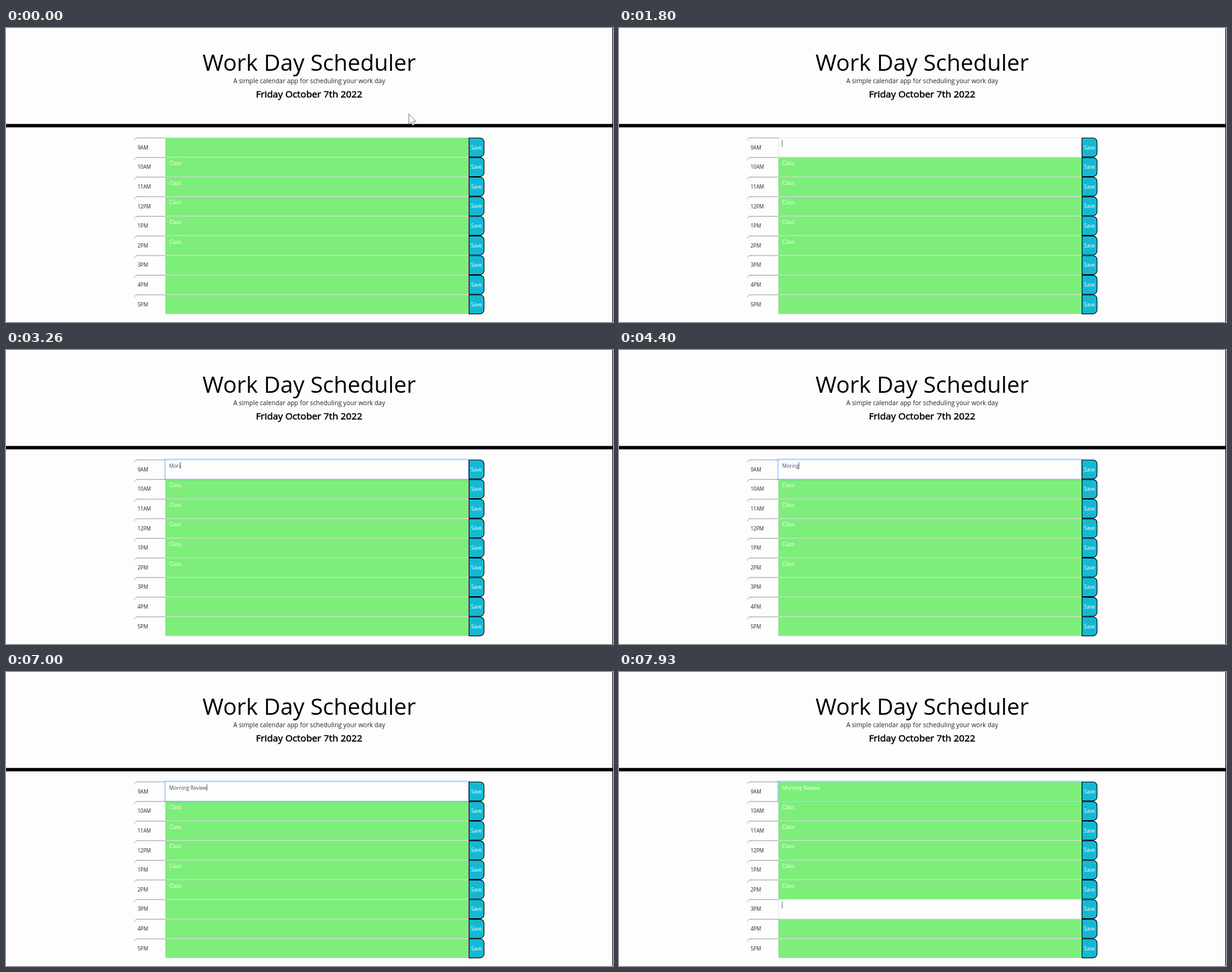
An HTML page with a canvas for the animation above (8000 ms loop, 980 by 474 pixels).

```html
<!DOCTYPE html>
<html lang="en">
<head>
<meta charset="utf-8">
<title>Work Day Scheduler</title>
<style>
  html, body { margin: 0; width: 100%; height: 100%; overflow: hidden; background: #fdfdfd; }
  canvas { display: block; width: 980px; height: 474px; }
</style>
</head>
<body>
<canvas id="stage"></canvas>
<script>
const W = 980, H = 474, LOOP = 8000;
const canvas = document.getElementById('stage');
const ctx = canvas.getContext('2d');
const dpr = window.devicePixelRatio || 1;
canvas.width = W * dpr;
canvas.height = H * dpr;

const PAPER = '#fdfdfd', GREEN = '#7dee79', CYAN = '#13b9d3';
const HOURS = ['9AM', '10AM', '11AM', '12PM', '1PM', '2PM', '3PM', '4PM', '5PM'];
const REM = 8.15;
const TOP = 176.7, PITCH = 31.63;
const LEFT = 207, FIELD = 257, BUTTON = 747, RIGHT = 772;
const EDGE = 0.6, FADE = 150;
const FIRST_CLICK = 1790, SECOND_CLICK = 7860, BLUR = 7920;

// [start ms, text, caret shown]
const TYPING = [
  [0, '', 1], [2330, '', 0], [2860, '', 1],
  [2930, 'M', 1], [3060, 'Mo', 1], [3200, 'Mor', 1], [3260, 'Mori', 1],
  [3400, 'Morin', 1], [3600, 'Moring', 1], [4000, 'Moring', 0], [4400, 'Moring', 1],
  [4530, 'Morin', 1], [4660, 'Mori', 1], [4800, 'Mor', 1],
  [5130, 'Morn', 1], [5330, 'Morni', 1], [5460, 'Mornin', 1], [5530, 'Morning', 1],
  [5730, 'Morning ', 1], [6060, 'Morning R', 1], [6130, 'Morning Re', 1],
  [6260, 'Morning Rev', 1], [6460, 'Morning Revi', 1], [6530, 'Morning Revie', 1],
  [6600, 'Morning Review', 1], [7130, 'Morning Review', 0], [7630, 'Morning Review', 1]
];

const clamp = v => Math.min(1, Math.max(0, v));
const ease = v => v * v * (3 - 2 * v);
const fade = (t, from) => ease(clamp((t - from) / FADE));
const mix = (a, b, k) => `rgb(${a.map((v, i) => Math.round(v + (b[i] - v) * k))})`;

function text(str, x, y, size, color, align = 'left') {
  ctx.font = `${size}px "Open Sans", sans-serif`;
  ctx.textAlign = align;
  ctx.fillStyle = color;
  ctx.fillText(str, x, y);
}

function rect(x, y, w, h, color) {
  ctx.fillStyle = color;
  ctx.fillRect(x, y, w, h);
}

function header() {
  text('Work Day Scheduler', 489.5, 69, REM * 4.5, '#000', 'center');
  text('A simple calendar app for scheduling your work day', 489.5, 89.4, REM * 1.25, '#212529', 'center');
  const date = 'Friday October 7th 2022';
  text(date, 489.3, 112.3, REM * 1.875, '#000', 'center');
  ctx.strokeStyle = '#000';
  ctx.lineWidth = 0.55;
  ctx.lineJoin = 'round';
  ctx.strokeText(date, 489.3, 112.3);
  rect(0, 154.7, W, 5.5, '#000');
  rect(979, 0, 1, H, '#000');
}

function hourLabel(hour, y) {
  const line = y + 0.4;
  ctx.lineWidth = 0.6;
  ctx.strokeStyle = '#888';
  ctx.beginPath();
  ctx.moveTo(LEFT + 0.2, line + 4.5);
  ctx.quadraticCurveTo(LEFT + 0.5, line + 0.4, LEFT + 4.5, line);
  ctx.stroke();
  ctx.lineWidth = 0.75;
  ctx.strokeStyle = '#222';
  ctx.setLineDash([1.5, 1]);
  ctx.beginPath();
  ctx.moveTo(LEFT + 4, line);
  ctx.lineTo(FIELD, line);
  ctx.stroke();
  ctx.setLineDash([]);
  text(hour, 212.4, y + 19, REM, '#212529');
}

function field({ y, value, focus, glow, caret }) {
  const w = BUTTON - FIELD;
  if (glow > 0) {
    const g = 1.63 * glow;
    rect(FIELD - g, y - g, w + 2 * g, PITCH + 2 * g, `rgba(0,123,255,${0.25 * glow})`);
  }
  rect(FIELD, y, w, PITCH, mix([206, 212, 218], [128, 189, 255], glow));
  rect(FIELD + EDGE, y + EDGE, w - 2 * EDGE, PITCH - 2 * EDGE, focus ? PAPER : GREEN);
  text(value, 263.6, y + 12.8, REM, focus ? '#495057' : '#fff');
  if (caret) {
    const x = Math.floor(263.6 + ctx.measureText(value).width);
    rect(x, y + 3.8, 0.8, 11.2, '#495057');
  }
}

function saveButton(y) {
  ctx.beginPath();
  ctx.roundRect(BUTTON + 0.5, y + 0.5, RIGHT - BUTTON - 0.7, PITCH - 1, [0, 6.5, 6.5, 0]);
  ctx.fillStyle = CYAN;
  ctx.fill();
  ctx.lineWidth = 1.1;
  ctx.strokeStyle = '#000';
  ctx.stroke();
  text('Save', 759.6, y + 18.8, REM, '#fff', 'center');
}

function pointer(t) {
  const k = ease(clamp((t - 60) / 400));
  const x = 650.5 - 14 * k, y = 138.5 + 44 * k;
  // Over a field the arrow gives way to an unseen text cursor.
  if (t >= 530 || y > TOP) return;
  const shape = [[0, 0], [0, 16.5], [3.7, 13.2], [6.3, 18.7], [8.7, 17.6], [6.3, 12.1], [11.6, 12.1]];
  ctx.beginPath();
  shape.forEach(([dx, dy]) => ctx.lineTo(x + dx, y + dy));
  ctx.closePath();
  ctx.fillStyle = '#fff';
  ctx.fill();
  ctx.lineWidth = 0.7;
  ctx.lineJoin = 'miter';
  ctx.strokeStyle = '#444';
  ctx.stroke();
}

function rowState(i, t) {
  const row = {
    y: TOP + i * PITCH,
    value: i > 0 && i < 6 ? 'Class' : '',
    focus: false, glow: 0, caret: false
  };
  if (i === 0) {
    const [, value, caret] = TYPING.findLast(step => t >= step[0]);
    row.value = value;
    row.focus = t >= FIRST_CLICK && t < SECOND_CLICK;
    row.caret = row.focus && caret;
    row.glow = fade(t, FIRST_CLICK) * (1 - fade(t, BLUR));
  } else if (i === 6 && t >= SECOND_CLICK) {
    row.focus = row.caret = true;
    row.glow = fade(t, BLUR);
  }
  return row;
}

function draw(t) {
  ctx.setTransform(dpr, 0, 0, dpr, 0, 0);
  rect(0, 0, W, H, PAPER);
  header();
  const rows = HOURS.map((hour, i) => rowState(i, t));
  rows.forEach((row, i) => hourLabel(HOURS[i], row.y));
  // The focused field lies above its neighbours.
  rows.filter(row => !row.focus).forEach(field);
  rows.filter(row => row.focus).forEach(field);
  rows.forEach(row => saveButton(row.y));
  pointer(t);
}

const start = performance.now();
function tick() {
  draw((performance.now() - start) % LOOP);
  requestAnimationFrame(tick);
}
tick();
</script>
</body>
</html>
```
